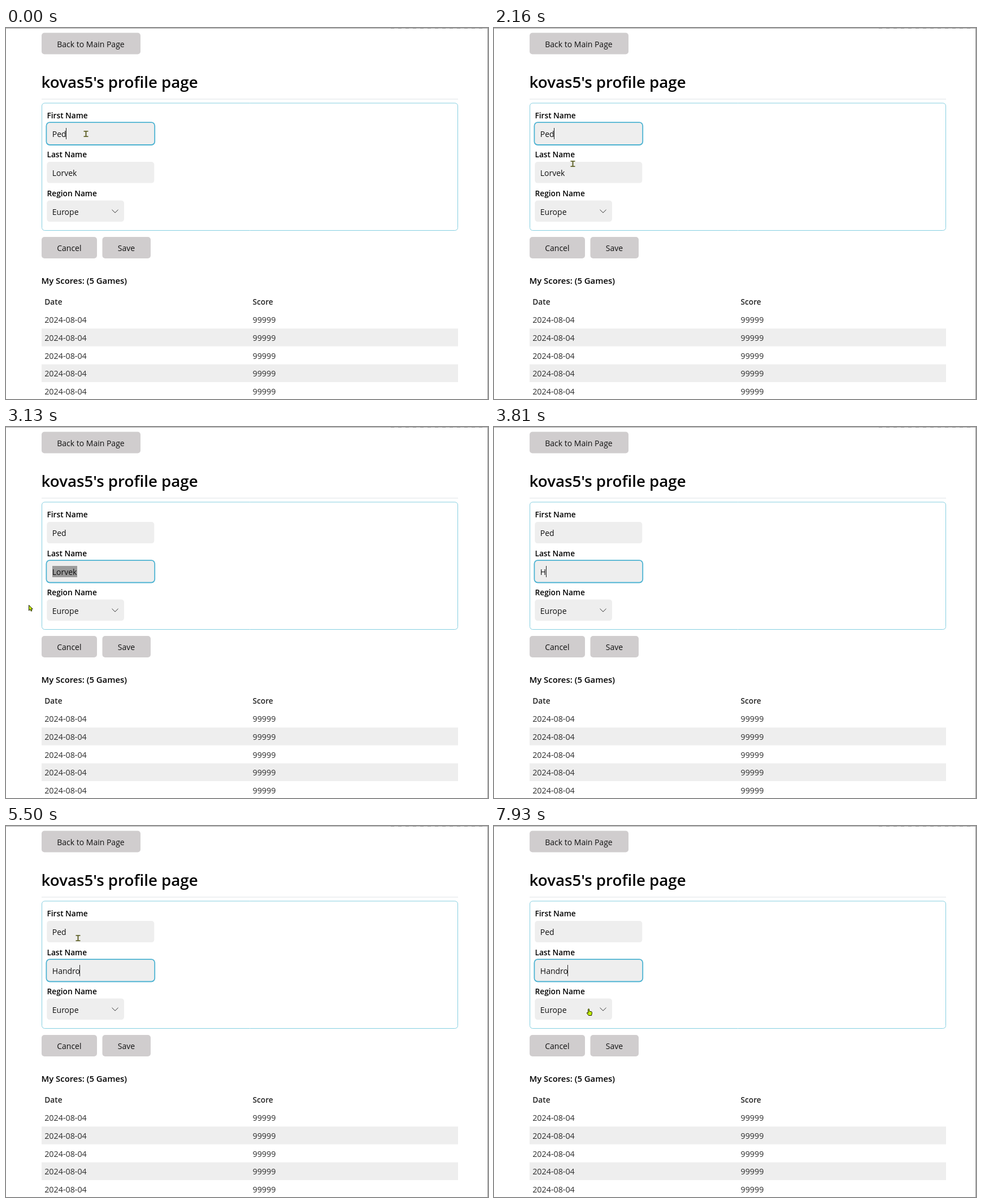
These frames come from a looping animation (853x657 px, 8 s). An HTML page with a canvas:

```html
<!DOCTYPE html>
<html lang="en">
<head>
<meta charset="utf-8">
<title>Profile page</title>
<style>
  html, body { margin: 0; width: 100%; height: 100%; overflow: hidden; background: #fff; }
  canvas { display: block; width: 100vw; height: 100vh; }
</style>
</head>
<body>
<canvas id="stage" width="853" height="657"></canvas>
<script>
const LOOP = 8000;
const ctx = document.getElementById('stage').getContext('2d');
const FAMILY = '"Open Sans", "Noto Sans", sans-serif';
const BODY = `14px ${FAMILY}`;
const LABEL = `600 13.7px ${FAMILY}`;
const CELL = `14.3px ${FAMILY}`;
const TEXT_X = 81.8;

const USER = 'kovas5';
const FIRST = 'Ped';
const OLD_LAST = 'Lorvek';
const NEW_LAST = 'Handro';
const KEY_TIMES = [3810, 4020, 4160, 4310, 4470, 4550];
const FIRST_BLINKS = [340, 900, 1450, 1980];
const LAST_BLINKS = [4900, 5400, 5920, 6510, 7040, 7570];

const FIRST_BOX = [72.3, 168.1, 190, 38];
const LAST_BOX = [72.3, 237, 190, 37.6];
const SELECT_BOX = [72.3, 305.5, 136.7, 37.6];

// Each pointer move advances in n visible jumps between two times.
const MOVES = [
  { start: 1190, end: 1720, n: 9, from: [141, 187], to: [95, 187] },
  { start: 1950, end: 2310, n: 6, from: [95, 187], to: [154, 258] },
  { start: 2460, end: 2520, n: 2, from: [154, 258], to: [94, 258] },
  { start: 2610, end: 2730, n: 2, from: [94, 258], to: [22, 261] },
  { start: 3010, end: 3130, n: 3, from: [22, 261], to: [40, 315] },
  { start: 4900, end: 5620, n: 11, from: [30, 339], to: [130, 193] },
  { start: 5710, end: 5710, n: 1, from: [130, 193], to: [131, 192] },
  { start: 6970, end: 7090, n: 3, from: [131, 192], to: [143, 192] },
  { start: 7570, end: 7930, n: 6, from: [143, 192], to: [168, 324], bend: [202, 250] }
];

const ARROW = new Path2D('M.5 .5V10L2.8 8L4.4 11.2L6 10.4L4.5 7.3H7.3Z');
const HAND = new Path2D('M-1.4 6V.3Q-.5 -1 .5 .3V4L4 4.7Q5.6 5 5.5 6.6L4.6 11.5H-.6' +
  'L-3.6 7.6Q-3.7 6 -2.4 6.3L-1.4 7.3Z');

const passed = (times, t) => times.filter(x => t >= x).length;
const isLit = (times, t) => passed(times, t) % 2 === 0;
const inside = ([x, y, w, h], [px, py]) => px >= x && px <= x + w && py >= y && py <= y + h;

function text(str, x, y, font = BODY, color = '#111') {
  ctx.font = font;
  ctx.fillStyle = color;
  ctx.fillText(str, x, y);
}

function roundBox([x, y, w, h], r) {
  ctx.beginPath();
  ctx.roundRect(x, y, w, h, r);
}

function fillBox(box, color, r = 5) {
  roundBox(box, r);
  ctx.fillStyle = color;
  ctx.fill();
}

function rect(x, y, w, h, color) {
  ctx.fillStyle = color;
  ctx.fillRect(x, y, w, h);
}

function textEnd(str) {
  ctx.font = BODY;
  return Math.floor(TEXT_X + ctx.measureText(str).width);
}

function caret(str, y) {
  rect(textEnd(str), y, 1, 20, '#222');
}

function focusRing([x, y, w, h], amount) {
  if (amount <= 0) return;
  const width = 1.8 * amount;
  const half = width / 2;
  roundBox([x - half, y - half, w + width, h + width], 6);
  ctx.globalAlpha = Math.min(1, 1.6 * amount ** 1.5);
  ctx.strokeStyle = '#4cb2d1';
  ctx.lineWidth = width;
  ctx.stroke();
  ctx.globalAlpha = 1;
}

function button(label, x, y, w) {
  fillBox([x, y, w, 38], '#d0cdce');
  text(label, x + 27.2, y + 25);
}

function drawPage() {
  rect(0, 0, 853, 657, '#fff');
  rect(0, 0, 853, 1, '#a6a6a6');
  rect(852, 0, 1, 657, '#9c9c9c');
  for (let x = 681; x < 838; x += 13) rect(x, 0, 6, 1, '#808080');

  button('Back to Main Page', 63, 8.5, 175);
  text(`${USER}'s profile page`, 62.5, 106, `600 27.7px ${FAMILY}`, '#000');
  rect(63, 125.5, 737, 1, '#dfe3e6');

  roundBox([63.5, 133, 736, 225.5], 5);
  ctx.strokeStyle = '#85cfe0';
  ctx.lineWidth = 1;
  ctx.stroke();
  text('First Name', 72.5, 160, LABEL, '#000');
  text('Last Name', 72.5, 229, LABEL, '#000');
  text('Region Name', 72.5, 298, LABEL, '#000');

  button('Cancel', 63, 370, 98);
  button('Save', 170.5, 370, 85.5);

  text('My Scores: (5 Games)', 62.5, 453, `600 14.9px ${FAMILY}`, '#000');
  text('Date', 68.3, 490.3, LABEL, '#222');
  text('Score', 436.5, 490.3, LABEL, '#222');
  for (let i = 0; i < 5; i++) {
    const y = 500.5 + i * 31.7;
    if (i % 2) rect(63, y, 737, 31.5, '#eee');
    text('2024-08-04', 68.2, y + 21.6, CELL, '#2d2d2d');
    text('99999', 436.5, y + 21.6, CELL, '#2d2d2d');
  }
}

function drawForm(t) {
  const shift = t < 2460 ? 0 : t < 2520 ? 0.2 : t < 2610 ? 0.65 : 1;
  const typed = passed(KEY_TIMES, t);
  const last = typed ? NEW_LAST.slice(0, typed) : OLD_LAST;

  [FIRST_BOX, LAST_BOX, SELECT_BOX].forEach(box => fillBox(box, '#eee'));
  focusRing(FIRST_BOX, 1 - shift);
  focusRing(LAST_BOX, shift);

  const selected = t >= 2610 && !typed;
  if (selected) rect(82, 246, textEnd(last) - 81, 20, '#9b9b9b');
  text(FIRST, TEXT_X, 193);
  text(last, TEXT_X, 262);
  text('Europe', TEXT_X, 331);

  if (t < 2460) {
    if (isLit(FIRST_BLINKS, t)) caret(FIRST, 177);
  } else if (!selected && isLit(LAST_BLINKS, t)) {
    caret(last, 246);
  }

  ctx.beginPath();
  ctx.moveTo(187.5, 321.8);
  ctx.lineTo(193, 327.2);
  ctx.lineTo(198.5, 321.8);
  ctx.strokeStyle = '#333';
  ctx.lineWidth = 1;
  ctx.stroke();
}

function pointerAt(t) {
  const move = MOVES.filter(m => t >= m.start).pop();
  if (!move) return MOVES[0].from;
  const { start, end, n, from, to, bend } = move;
  const ratio = end > start ? (t - start) / (end - start) : 1;
  const jump = Math.min(n, Math.floor(ratio * (n - 1) + 1e-6) + 1);
  const p = 1 - (1 - jump / n) ** 2;
  return from.map((a, i) => {
    const mid = bend ? bend[i] : (a + to[i]) / 2;
    return (1 - p) ** 2 * a + 2 * p * (1 - p) * mid + p * p * to[i];
  });
}

function drawBeam() {
  const color = '#62642c';
  rect(-3.5, -5, 8, 1.7, color);
  rect(-0.5, -4, 2, 9, color);
  rect(-3.5, 4.3, 8, 1.7, color);
}

function drawShape(path) {
  ctx.fillStyle = '#c3f000';
  ctx.fill(path);
  ctx.strokeStyle = '#1c1c00';
  ctx.lineWidth = 1;
  ctx.stroke(path);
}

function drawPointer(t) {
  if (t >= KEY_TIMES[0] && t < 4900) return;
  const pos = pointerAt(t);
  ctx.save();
  ctx.translate(Math.round(pos[0]), Math.round(pos[1]));
  if (t < 3010 || inside(FIRST_BOX, pos) || inside(LAST_BOX, pos)) drawBeam();
  else drawShape(inside(SELECT_BOX, pos) ? HAND : ARROW);
  ctx.restore();
}

function frame() {
  const t = performance.now() % LOOP;
  drawPage();
  drawForm(t);
  drawPointer(t);
  requestAnimationFrame(frame);
}
frame();
</script>
</body>
</html>
```
